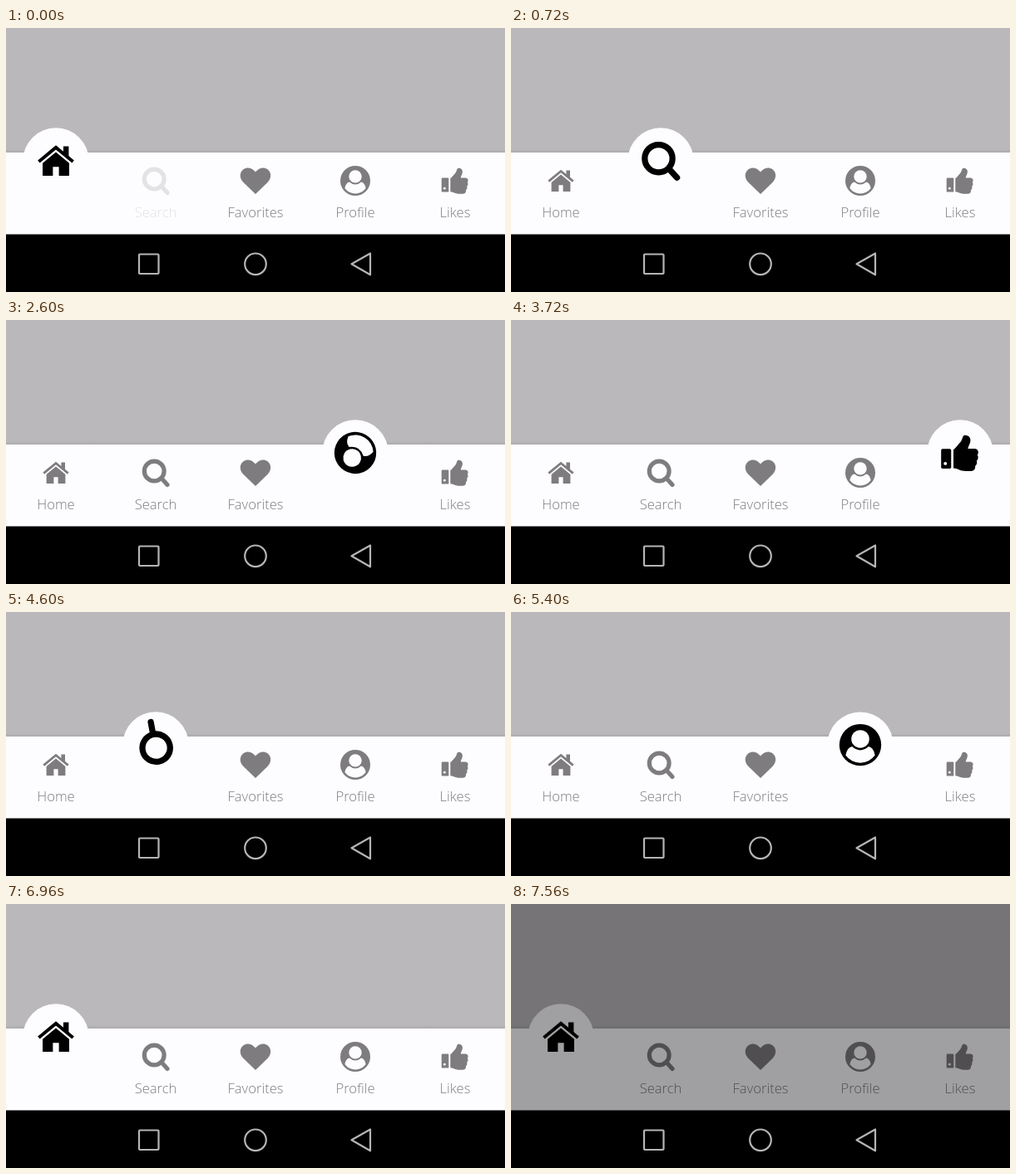
An HTML page that plays this animation: 600x318 px, repeating every 9 s.

```html
<!DOCTYPE html>
<html lang="en">
<head>
<meta charset="utf-8">
<title>Tab bar</title>
<style>
  html, body { margin: 0; width: 100%; height: 100%; overflow: hidden; }
  svg { display: block; width: 600px; height: 318px; }
  text { font: 300 16.6px "Open Sans", sans-serif; text-anchor: middle; }
  .hole { fill: #fdfcfe; stroke: none; }
</style>
</head>
<body>
<svg viewBox="0 0 600 318">
  <defs>
    <g id="home">
      <path d="M-14.7 .7L0 -11.5L14.7 .7" fill="none" stroke-width="2.8"/>
      <path d="M6.4 -12.5h4.6v11l-4.6 -4zM-11.4 2L0 -7.5L11.4 2V12.9H2.6V5.2H-2.6V12.9H-11.4Z" stroke="none"/>
    </g>
    <g id="search" fill="none" stroke-width="5.2" stroke-linecap="round">
      <circle cx="-1.8" cy="-2" r="11.9"/>
      <path d="M7 6.8L14 14.4"/>
    </g>
    <path id="favorites" stroke="none" d="M0 16L-14.5 2C-22 -6 -17 -15.5 -9 -15.5C-4 -15.5 0 -10.5 0 -10.5C0 -10.5 4 -15.5 9 -15.5C17 -15.5 22 -6 14.5 2Z"/>
    <g id="profile">
      <circle r="18" stroke="none"/>
      <circle class="hole" cy="-5.1" r="7.7"/>
      <path class="hole" d="M12.6 8.9Q11.6 2.4 7.1 1.4Q0 7.6 -7.1 1.4Q-11.6 2.4 -12.6 8.9A15.4 15.4 0 0 0 12.6 8.9Z"/>
    </g>
    <g id="likes">
      <rect x="-16.3" y="-3.4" width="8.6" height="17" rx="1.2" stroke="none"/>
      <circle class="hole" cx="-12.7" cy="9.2" r="1.4"/>
      <path stroke="none" d="M-5.7 -2.9C-4.5 -3 -1 -8 .5 -9.5C2 -11 2 -15.2 4 -15.2C8.2 -15.2 8.9 -12.5 8.9 -10.5C8.9 -8 7 -6 6.7 -3.6H12.5C15.5 -3.6 16.5 0 14.8 1.8C16 3.5 15.5 5.8 14.2 6.8C14.9 8.8 14.2 10.5 12.9 11.4C13.5 14 11.5 15.8 8.5 15.8H5C0 15.8 -2.5 13.3 -5.7 13.3Z"/>
    </g>
    <linearGradient id="shadow" x2="0" y2="1">
      <stop offset="0" stop-opacity="0"/>
      <stop offset="1" stop-opacity=".08"/>
    </linearGradient>
  </defs>
  <rect width="600" height="150" fill="#bab8ba"/>
  <rect y="146" width="600" height="4" fill="url(#shadow)"/>
  <rect y="150" width="600" height="99" fill="#fdfcfe"/>
  <g id="tabs"></g>
  <rect id="dim" width="600" height="249" fill-opacity=".37"/>
  <rect y="248.5" width="600" height="69.5"/>
  <g fill="none" stroke="#b5b5b5" stroke-width="2.2" stroke-linejoin="round">
    <rect x="160" y="272.5" width="23.5" height="23.5" rx="1"/>
    <circle cx="300" cy="284.3" r="12.8"/>
    <path d="M415.5 284.3L438 271.5V297.3Z"/>
  </g>
</svg>
<script>
const LOOP = 9000, FRAME = 40, DIM_AT = 7560;
const GREY = '#7e7c7f';
const names = ['Home', 'Search', 'Favorites', 'Profile', 'Likes'];

// Each tap: finger down, first and last moment of motion, chosen tab.
const taps = [
  [0, 120, 720, 1], [1160, 1200, 1800, 2], [1960, 2160, 2760, 3],
  [2960, 3160, 3720, 4], [4040, 4200, 4760, 1], [5000, 5160, 5960, 3],
  [6200, 6400, 6960, 0],
];

const tabsRoot = document.getElementById('tabs');
const dim = document.getElementById('dim');
tabsRoot.innerHTML = names.map((name, i) => `
  <g transform="translate(${60 + 120 * i} 0)">
    <circle class="hole" r="39.7"/>
    <use href="#${name.toLowerCase()}"/>
    <text y="228" fill="${GREY}">${name}</text>
  </g>`).join('');
const tabs = [...tabsRoot.children].map(group => {
  const [bubble, icon, label] = group.children;
  return { group, bubble, icon, label };
});

const progress = (t, start, length) => Math.min(1, Math.max(0, (t - start) / length));
const easeInOut = p => p < .5 ? 2 * p * p : 1 - 2 * (1 - p) ** 2;
const ease = (t, start, length) => easeInOut(progress(t, start, length));

function stateAt(t) {
  const state = { selected: 0, pressed: -1, rise: 1, spin: 1, opacity: 1 };
  for (const [down, first, last, tab] of taps) {
    if (t >= first) {
      const start = first - 50;
      state.selected = tab;
      state.pressed = -1;
      state.rise = ease(t, start, 300);
      state.spin = ease(t, last - 324, 300);
      state.opacity = .2 + .8 * ease(t, start, 250);
    } else if (t >= down) {
      state.pressed = tab;
    }
  }
  return state;
}

function draw(now) {
  const t = Math.floor(now % LOOP / FRAME) * FRAME;
  const { selected, pressed, rise, spin, opacity } = stateAt(t);
  tabs.forEach(({ group, bubble, icon, label }, i) => {
    const active = i === selected;
    const y = active ? 198 - 38 * rise : 184;
    const color = active ? '#000' : GREY;
    bubble.setAttribute('cy', y);
    bubble.setAttribute('visibility', active ? 'visible' : 'hidden');
    label.setAttribute('visibility', active ? 'hidden' : 'visible');
    icon.setAttribute('fill', color);
    icon.setAttribute('stroke', color);
    icon.setAttribute('transform', `translate(0 ${y})` +
      (active ? ` rotate(${360 * spin}) scale(1.4)` : ''));
    group.setAttribute('opacity', active ? opacity : i === pressed ? .2 : 1);
  });
  dim.setAttribute('visibility', t >= DIM_AT ? 'visible' : 'hidden');
}

const begin = performance.now();
(function tick() {
  draw(performance.now() - begin);
  requestAnimationFrame(tick);
})();
</script>
</body>
</html>
```
